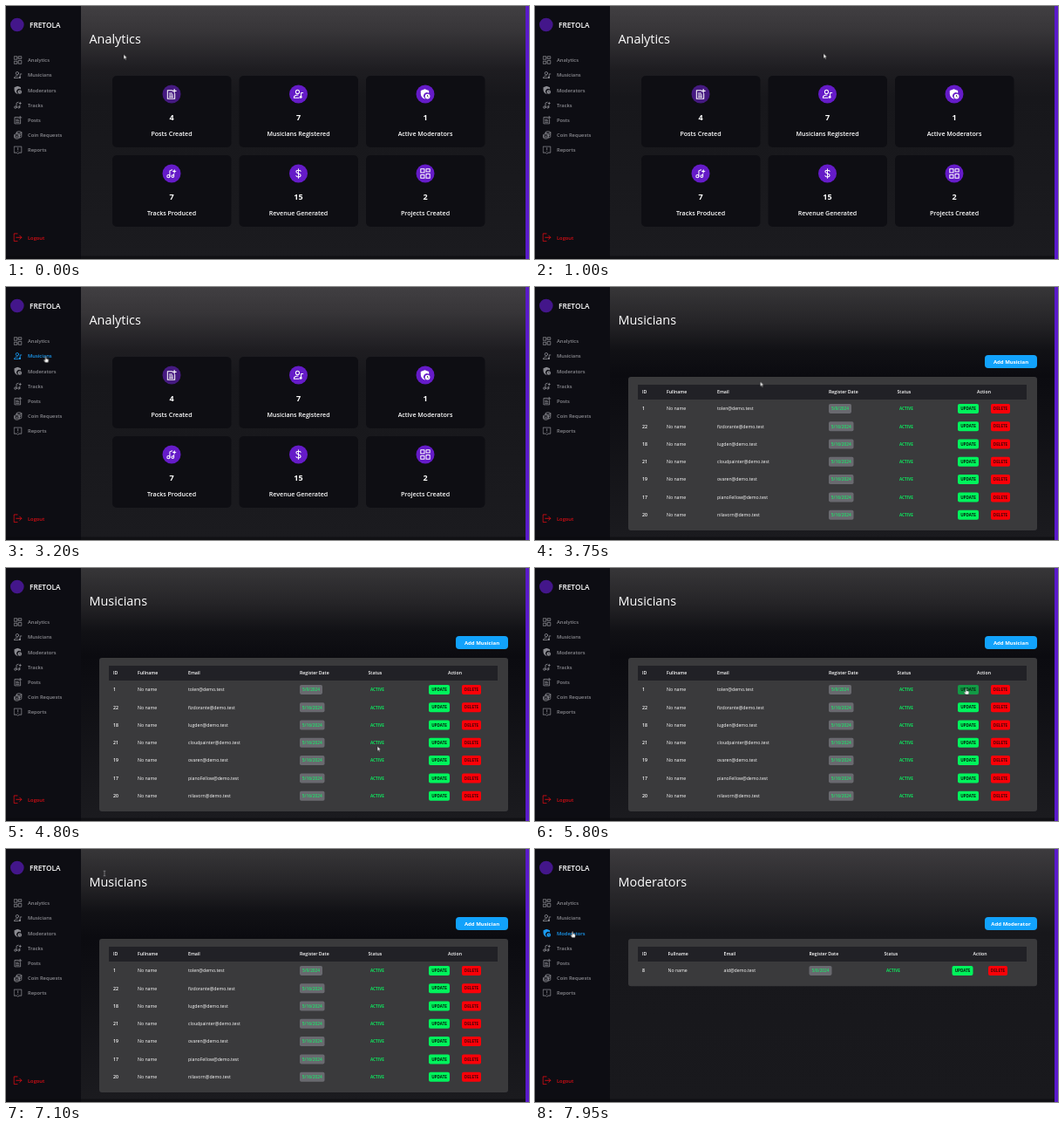
An HTML page that plays this animation: 600x290 px, repeating every 8000 ms.

```html
<!DOCTYPE html>
<html lang="en">
<head>
<meta charset="utf-8">
<title>Admin dashboard</title>
<style>
html, body { margin: 0; width: 100%; height: 100%; overflow: hidden; background: #0c0c12; }
svg { display: block; }
#stage { width: 600px; height: 290px; font-family: "Open Sans", "Noto Sans", sans-serif; }
text { fill: currentColor; }
.mid { text-anchor: middle; }
.title { font-size: 14.4px; font-weight: 500; }
.brand { font-size: 8.3px; font-weight: 600; }
.nav { font-size: 5.75px; font-weight: 600; }
.count { font-size: 9px; font-weight: 700; }
.label { font-size: 7.1px; font-weight: 600; }
.head { font-size: 5.2px; font-weight: 600; }
.cell { font-size: 5.2px; font-weight: 500; }
.date { font-size: 4.8px; font-weight: 600; }
.tag { font-size: 4.6px; font-weight: 700; }
.add { font-size: 6px; font-weight: 700; }
.line { fill: none; stroke: currentColor; stroke-width: 2; stroke-linejoin: round; stroke-linecap: round; }

/* Hard switches: pages, hover colours, pointer shapes */
.page, .item, .hot, .shape { animation: 8s step-end infinite; }
#analytics { animation-name: analytics; }
#musicians { animation-name: musicians; }
#moderators { animation-name: moderators; }
#nav0 { animation-name: hover0; }
#nav1 { animation-name: hover1; }
#nav2 { animation-name: hover2; }
.hot { animation-name: press; }
#arrow { animation-name: arrow; }
#hand { animation-name: hand; }
#beam { animation-name: beam; }
#pointer { animation: travel 8s ease-in-out infinite; }

@keyframes analytics { 0% { visibility: visible } 41.9%, 100% { visibility: hidden } }
@keyframes musicians { 0% { visibility: hidden } 41.9% { visibility: visible } 97.5%, 100% { visibility: hidden } }
@keyframes moderators { 0% { visibility: hidden } 97.5%, 100% { visibility: visible } }
@keyframes hover0 { 0% { color: #8b8b91 } 26% { color: #1a9cf5 } 34%, 100% { color: #8b8b91 } }
@keyframes hover1 { 0% { color: #8b8b91 } 34% { color: #1a9cf5 } 42.5%, 100% { color: #8b8b91 } }
@keyframes hover2 { 0% { color: #8b8b91 } 94.4%, 100% { color: #1a9cf5 } }
@keyframes press { 0% { fill: #00f45c } 68% { fill: #129a45 } 81.3%, 100% { fill: #00f45c } }
@keyframes arrow {
  0% { opacity: 1 } 26% { opacity: 0 } 42.5% { opacity: 1 } 68% { opacity: 0 }
  81.3% { opacity: 1 } 86% { opacity: 0 } 89.4% { opacity: 1 } 94.4%, 100% { opacity: 0 }
}
@keyframes hand {
  0% { opacity: 0 } 26% { opacity: 1 } 42.5% { opacity: 0 } 68% { opacity: 1 }
  81.3% { opacity: 0 } 94.4%, 100% { opacity: 1 }
}
@keyframes beam { 0% { opacity: 0 } 86% { opacity: 1 } 89.4%, 100% { opacity: 0 } }
@keyframes travel {
  0% { transform: translate(135px, 55.5px) }
  10.6%, 12.5% { transform: translate(331px, 54.5px) }
  16.5% { transform: translate(480px, 100px) }
  21.3% { transform: translate(500px, 234px) }
  26.9%, 32.5% { transform: translate(40px, 62px) }
  36%, 42% { transform: translate(45.5px, 79.5px) }
  46%, 47.5% { transform: translate(258.5px, 108.5px) }
  53.8% { transform: translate(300px, 160px) }
  59% { transform: translate(420px, 204px) }
  64.4% { transform: translate(505px, 208px) }
  68.8%, 80.6% { transform: translate(494.5px, 138px) }
  86.3%, 88.8% { transform: translate(113px, 28px) }
  95%, 100% { transform: translate(43px, 94.5px) }
}
</style>
</head>
<body>
<svg id="stage" viewBox="0 0 600 290">
  <defs>
    <linearGradient id="bg-analytics" x2="0" y2="1">
      <stop stop-color="#413f42"/><stop offset=".1" stop-color="#373538"/>
      <stop offset=".25" stop-color="#1e1d21"/><stop offset=".36" stop-color="#17171b"/>
      <stop offset="1" stop-color="#1b1b1f"/>
    </linearGradient>
    <linearGradient id="bg-musicians" x2="0" y2="1">
      <stop stop-color="#373638"/><stop offset=".14" stop-color="#252427"/>
      <stop offset=".25" stop-color="#111115"/><stop offset=".35" stop-color="#0b0b10"/>
      <stop offset="1" stop-color="#1b1b1f"/>
    </linearGradient>
    <linearGradient id="bg-moderators" x2="0" y2="1">
      <stop stop-color="#3d3b3e"/><stop offset=".17" stop-color="#29282b"/>
      <stop offset=".33" stop-color="#17171b"/><stop offset="1" stop-color="#19191d"/>
    </linearGradient>

    <symbol id="grid" viewBox="0 0 24 24"><path class="line" d="M2 2h8v8H2zM14 2h8v6h-8zM14 13h8v9h-8zM2 15h8v7H2z"/></symbol>
    <symbol id="person" viewBox="0 0 24 24">
      <path class="line" d="M2 20c0-5 4-6 9-6M2 20h11M18 18V9h4"/>
      <circle class="line" cx="10" cy="7" r="4"/><circle cx="17" cy="18.5" r="2.8" fill="currentColor"/>
    </symbol>
    <symbol id="shield" viewBox="0 0 24 24">
      <path fill="currentColor" d="M11 1l9 3.5V10a7 7 0 0 0-9 11l1 2C5 21 2 16 2 11V4.500z"/>
      <circle cx="17" cy="17" r="5.500" fill="currentColor"/>
      <path d="M17 14v3l2 1.500" fill="none" stroke="#15151b" stroke-width="1.500"/>
    </symbol>
    <symbol id="note" viewBox="0 0 24 24">
      <path class="line" d="M8 18V6l5-2M17 17V13"/>
      <circle class="line" cx="5" cy="18" r="3"/><circle class="line" cx="14.500" cy="18" r="2.500"/>
      <path fill="currentColor" d="M18 2l1.400 3.600L23 7l-3.600 1.400L18 12l-1.400-3.600L13 7l3.600-1.400z"/>
    </symbol>
    <symbol id="post" viewBox="0 0 24 24"><path class="line" d="M13 4H3v18h16V11M18 1v8M14 5h8M7 10h6M7 14h8M7 18h8"/></symbol>
    <symbol id="coins" viewBox="0 0 24 24">
      <ellipse class="line" cx="15" cy="5" rx="7" ry="3"/><ellipse class="line" cx="9" cy="12" rx="7" ry="3"/>
      <path class="line" d="M22 5v11c0 2-3 3-6 3M8 5v4M22 10c0 2-3 3-6 3M2 12v7c0 4 14 4 14 0v-7M2 16c0 4 14 4 14 0"/>
    </symbol>
    <symbol id="report" viewBox="0 0 24 24"><path class="line" d="M2 2h20v17h-7l-3 3-3-3H2zM12 6v5M12 15v.2"/></symbol>
    <symbol id="dollar" viewBox="0 0 24 24"><path class="line" d="M12 2v20M17 7c-1-3-10-3-10 1s10 3 10 8-9 4-10 1"/></symbol>
    <symbol id="exit" viewBox="0 0 24 24"><path class="line" d="M11 2H2v20h9M8 12h14M17 7l5 5-5 5"/></symbol>
  </defs>

  <g id="pages" color="#fff"></g>
  <rect width="86" height="290" fill="#0d0d13"/>
  <rect y="286.500" width="596" height="3.500" fill="#0a0a0e" opacity=".6"/>
  <rect x="596" width="4" height="290" fill="#5a1acb"/>
  <circle cx="12.800" cy="21.500" r="7.800" fill="#43168a"/>
  <g id="side"></g>

  <g id="pointer">
    <path id="arrow" class="shape" d="M0 0v5.500l1.300-1.200.9 2 .9-.4-.9-1.900h1.700z" fill="#fff" stroke="#111" stroke-width=".4"/>
    <path id="hand" class="shape" d="M-.6.600q.7-1 1.300 0v2.100l2 .5q.8.200.7 1L3 7H-.4l-2-2.600q.3-1 1.800.1z" fill="#fff" stroke="#111" stroke-width=".4"/>
    <path id="beam" class="shape" d="M-1.300-2.800h2.600M0-2.800v5.600M-1.300 2.800h2.600" fill="none" stroke="#a5a5a8" stroke-width=".6"/>
  </g>
</svg>

<script>
const text = (x, y, cls, str, color = "") =>
  `<text x="${x}" y="${y}" class="${cls}"${color && ` style="fill:${color}"`}>${str}</text>`;
const box = (x, y, w, h, r, fill, cls = "") =>
  `<rect x="${x}" y="${y}" width="${w}" height="${h}" rx="${r}" fill="${fill}" class="${cls}"/>`;
const icon = (name, cx, cy, size) =>
  `<use href="#${name}" x="${cx - size / 2}" y="${cy - size / 2}" width="${size}" height="${size}"/>`;
const page = (id, title, body) =>
  `<g id="${id}" class="page">${box(86, 0, 510, 290, 0, `url(#bg-${id})`)}${text(95.5, 43, "title", title)}${body}</g>`;

function card([name, count, label], i) {
  const x = 122 + (i % 3) * 145.5, y = i < 3 ? 80 : 171, cx = x + 68;
  return box(x, y, 136.5, 82, 5, "#0e0e13")
    + `<circle cx="${cx}" cy="${y + 21}" r="10.5" fill="${i ? "#651bc8" : "#451a80"}"/>`
    + icon(name, cx, y + 21, 12.5)
    + text(cx, y + 50.8, "count mid", count)
    + text(cx, y + 68.7, "label mid", label);
}

// cols: left edges of name, email, date, status, update, delete
function table(button, cols, action, rows, hot) {
  const [name, email, date, status, update, del] = cols;
  const heads = [[123, "ID"], [name, "Fullname"], [email, "Email"], [date, "Register Date"], [status, "Status"]];
  const line = ([id, user, day], i) => {
    const y = 139.3 + i * 20.3, base = y + 1.9, top = y - 5.4, w = day.length > 8 ? 28.5 : 26;
    return text(123, base, "head", id)
      + text(name, base, "cell", "No name")
      + text(email, base, "cell", user + "@demo.test")
      + box(date, top, w, 11, 1.8, "#69696f")
      + text(date + w / 2, base, "date mid", day, "#1fe06a")
      + text(status + 2.5, base, "tag", "ACTIVE", "#0fe35e")
      + box(update, top, 24, 11, 2, "#00f45c", hot && !i ? "hot" : "")
      + text(update + 12, base - .2, "tag mid", "UPDATE", "#06230f")
      + box(del, top, 22, 11, 2, "#fb0008")
      + text(del + 11, base - .2, "tag mid", "DELETE", "#4d0308");
  };
  return box(516, 78, 60, 15, 4, "#12a2fb")
    + text(546, 87.7, "add mid", button)
    + box(107, 103, 469, 33.9 + rows.length * 20.3, 3, "#3a3a3c")
    + box(118, 112, 446, 17, 0, "#212126")
    + heads.map(([x, s]) => text(x, 122.4, "head", s)).join("")
    + text(action, 122.4, "head mid", "Action")
    + rows.map(line).join("");
}

const cards = [
  ["post", 4, "Posts Created"], ["person", 7, "Musicians Registered"], ["shield", 1, "Active Moderators"],
  ["note", 7, "Tracks Produced"], ["dollar", 15, "Revenue Generated"], ["grid", 2, "Projects Created"]
];
const late = "5/16/2024";
const musicians = [
  [1, "tolen", "5/9/2024"], [22, "fizdorante", late], [18, "lugden", late], [21, "cloudpainter", late],
  [19, "ovaren", late], [17, "pianoFellow", late], [20, "nilavorn", late]
];
const menu = [
  ["grid", "Analytics"], ["person", "Musicians"], ["shield", "Moderators"], ["note", "Tracks"],
  ["post", "Posts"], ["coins", "Coin Requests"], ["report", "Reports"]
];

document.getElementById("pages").innerHTML =
  page("analytics", "Analytics", cards.map(card).join(""))
  + page("musicians", "Musicians",
    table("Add Musician", [151, 209, 337, 415.5, 485, 523], 515, musicians, true))
  + page("moderators", "Moderators",
    table("Add Moderator", [152.5, 216.5, 314.5, 400.5, 478.5, 520], 510.5, [[8, "aid", "5/8/2024"]]));

document.getElementById("side").innerHTML =
  text(27, 24.6, "brand", "FRETOLA", "#fff")
  + menu.map(([name, label], i) => {
    const y = 62 + i * 17.2;
    return `<g id="nav${i}" class="item" color="#8b8b91">${icon(name, 13.7, y, 10)}${text(25, y + 2.1, "nav", label)}</g>`;
  }).join("")
  + `<g color="#d80d14">${icon("exit", 13.5, 265.3, 10.5)}${text(25, 267.6, "nav", "Logout")}</g>`;
</script>
</body>
</html>
```
